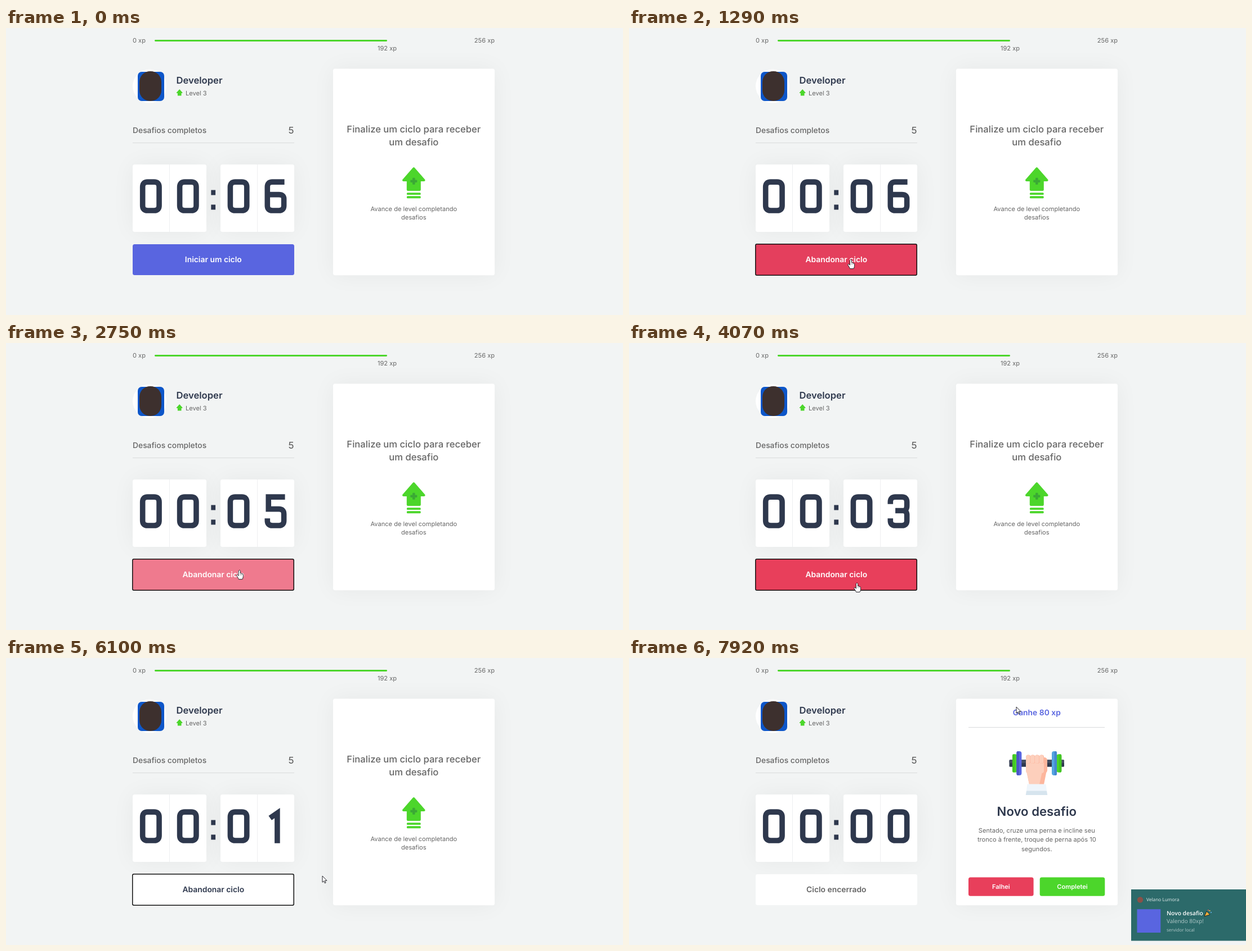
An HTML page with a canvas that plays this animation: 1096 px wide and 511 px high, repeating every 7990 ms.

```html
<!DOCTYPE html>
<html lang="pt-BR">
<head>
<meta charset="utf-8">
<title>Ciclo de desafios</title>
<style>
html, body { margin: 0; width: 100%; height: 100%; overflow: hidden; background: #f2f4f4; }
canvas { display: block; }
</style>
</head>
<body>
<canvas id="stage" width="1096" height="511"></canvas>
<script>
const ctx = document.getElementById('stage').getContext('2d');
const LOOP = 7990, FOCUS = 1060, CLICK = 1130, FINISH = 7110, NOTIFY = 7440;
const INK = '#2e384d', GRAY = '#666666', LINE = '#d9dadc', GREEN = '#4cd62b';
const BLUE = [89, 101, 224], DARK_BLUE = [73, 83, 184], RED = [232, 63, 91], WHITE = [255, 255, 255];
const SMALL = 11.09, MEDIUM = 13.86, LARGE = 16.63;
const LEFT = 225, WIDE = 287, MID = LEFT + 143.3, PANEL = 581, PANEL_MID = 724.3;

const rgb = c => `rgb(${c.map(Math.round)})`;
const mix = (a, b, p) => a.map((v, i) => v + (b[i] - v) * p);
const easeOut = (t, start, end, power = 2) =>
  1 - (1 - Math.max(0, Math.min(1, (t - start) / (end - start)))) ** power;

// pointer glides: start, end, goal x, goal y, upward bow
const ENTRY = [1008, 496];
const GLIDES = [
  [70, 910, 394, 412, 162],
  [1360, 1830, 547, 284, 0],
  [2400, 2875, 405, 427, 50],
  [4870, 5107, 561, 396, 0],
  [5340, 5440, 562, 388, 0],
  [7400, 7920, 688, 87, 0]
];

// when the cycle button heads for a new colour
const FILLS = [
  [-999, BLUE], [700, DARK_BLUE], [CLICK, RED], [1412, WHITE], [2670, RED], [4956, WHITE]
];

// moments at which the clock loses a second
const TICKS = [2140, 3060, 4070, 5150, 6100, FINISH];

// digits are stroked from shared hooks and bowls
const HOOK = 'M5 18V14Q5 5 14 5H26Q35 5 35 14';
const BOWL = 'V48Q35 57 26 57H14Q5 57 5 48';
const DIGITS = [
  'M14 5H26Q35 5 35 14' + BOWL + 'V14Q5 5 14 5Z',
  'M10 16L23 7V62',
  HOOK + 'V20Q35 25 32 29L6 52V57H39',
  HOOK + 'V21Q35 30 28 30H14M28 30Q35 30 35 38' + BOWL + 'V44',
  'M18 0L5 45H44M31 28V62',
  'M37 5H7V27H26Q35 27 35 36' + BOWL + 'V44',
  'M36 5H14Q5 5 5 14V48Q5 57 14 57H26Q35 57 35 48V36Q35 28 26 28H5'
].map(d => new Path2D(d));
const ARROW_UP = new Path2D('M0 2L18.3 23H10.5V40H-10.5V23H-18.3Z');
const POINTER = new Path2D('M0 0V11.3L2.6 9L4.3 12.9L6.1 12.1L4.4 8.3H8Z');
const HAND = new Path2D('M-1.6 1.5Q0-1.5 1.5 1.5V5.8Q3.2 5 4 6.5Q6.4 6.4 6.5 8.5V11.5' +
  'Q6.5 13.5 5 16.5H-1.5Q-2 14.5-4.6 11Q-6 8.7-4.4 8.2Q-3.2 8-1.6 10.2Z');

function box(x, y, w, h, fill, r = 0) {
  ctx.fillStyle = fill;
  ctx.beginPath();
  ctx.roundRect(x, y, w, h, r);
  ctx.fill();
}

function disc(x, y, r, fill) {
  box(x - r, y - r, 2 * r, 2 * r, fill, r);
}

// a four-sided block that narrows from one width to another
function taper(x, y, h, top, bottom, fill) {
  ctx.fillStyle = fill;
  ctx.beginPath();
  ctx.moveTo(x - top / 2, y);
  ctx.lineTo(x + top / 2, y);
  ctx.lineTo(x + bottom / 2, y + h);
  ctx.lineTo(x - bottom / 2, y + h);
  ctx.fill();
}

// y is the middle of the capitals
function text(str, x, y, size, weight = 400, color = GRAY, align = 'left', face = 'Inter') {
  ctx.font = `${weight} ${size}px ${face}, sans-serif`;
  ctx.textAlign = align;
  ctx.fillStyle = color;
  ctx.fillText(str, x, Math.floor(y + size * 0.364));
}
const center = (str, x, y, size, weight, color) => text(str, x, y, size, weight, color, 'center');
const lines = (rows, y, lead, size, weight) =>
  rows.forEach((row, i) => center(row, PANEL_MID, y + i * lead, size, weight));

function card(x, y, w, h) {
  ctx.save();
  ctx.shadowColor = 'rgba(0,0,25,.05)';
  ctx.shadowBlur = 41.6;
  box(x, y, w, h, '#fff', 3.5);
  ctx.restore();
}

function shape(path, x, y, scale, fill, stroke, width) {
  ctx.save();
  ctx.translate(x, y);
  ctx.scale(scale, scale);
  ctx.lineJoin = 'round';
  ctx.lineWidth = width;
  ctx.fillStyle = fill;
  ctx.strokeStyle = stroke;
  ctx.fill(path);
  ctx.stroke(path);
  ctx.restore();
}

function header() {
  text('0 xp', LEFT, 22.3, SMALL);
  box(264, 21, 413, 3, GREEN, 1.4);
  center('192 xp', 677, 36.2, SMALL);
  text('256 xp', 868, 22.3, SMALL, 400, GRAY, 'right');
}

function profile() {
  disc(255, 103.5, 30, '#fff');
  box(234, 78, 47, 52, '#0d56c9', 7);
  box(237, 77, 39, 53, '#3d302e', 19);
  text('Developer', 302.5, 93.7, LARGE, 600, INK);
  shape(ARROW_UP, 308.2, 109.3, 0.265, GREEN, GREEN, 4);
  text('Level 3', 319, 116.7, SMALL);
  text('Desafios completos', LEFT, 182.8, MEDIUM, 500);
  text('5', 511.5, 182.8, LARGE, 500, GRAY, 'right');
  box(LEFT, 204, WIDE, 1, LINE);
}

function digit(n, x) {
  ctx.save();
  ctx.translate(x, 269.2);
  ctx.scale(0.978, 0.978);
  ctx.strokeStyle = INK;
  ctx.lineWidth = 9.8;
  ctx.stroke(DIGITS[n]);
  ctx.restore();
}

function clock(t) {
  const seconds = 6 - TICKS.filter(k => t >= k).length;
  for (const x of [LEFT, LEFT + 156]) {
    card(x, 243, 131, 120);
    box(x + 65, 243, 1, 120, '#eeeff1');
  }
  [0, 0, 0, seconds].forEach((n, i) => digit(n, 237.8 + i * 65.9 + (i > 1 ? 23.9 : 0)));
  for (const y of [288.5, 314.5]) box(364.3, y, 7.8, 9, INK);
}

function cycleButton(t) {
  const i = FILLS.findLastIndex(f => t >= f[0]);
  const [start, fill] = FILLS[i];
  const before = i ? FILLS[i - 1][1] : fill;
  const done = t >= FINISH;
  box(LEFT, 385, WIDE, 55, rgb(mix(before, fill, easeOut(t, start, start + 200, 2.3))), 3.5);
  if (t >= FOCUS && !done) {
    ctx.strokeStyle = '#101010';
    ctx.lineWidth = 1.5;
    ctx.beginPath();
    ctx.roundRect(224.75, 384.75, 286.5, 55.5, 2.5);
    ctx.stroke();
  }
  const label = done ? 'Ciclo encerrado' : t >= CLICK ? 'Abandonar ciclo' : 'Iniciar um ciclo';
  center(label, MID, 412.8, MEDIUM, 600, done ? GRAY : fill === WHITE ? INK : '#fff');
}

function idlePanel() {
  lines(['Finalize um ciclo para receber', 'um desafio'], 180.6, 23.2, LARGE, 500);
  shape(ARROW_UP, PANEL_MID, 248, 1, GREEN, GREEN, 4);
  box(PANEL_MID - 6, 270.4, 12, 4.6, '#3ba935', 1.2);
  box(PANEL_MID - 2.3, 266.7, 4.6, 12, '#3ba935', 1.2);
  for (const y of [293.2, 299.3]) box(PANEL_MID - 12.4, y, 24.8, 3.9, GREEN, 1.5);
  lines(['Avance de level completando', 'desafios'], 322.3, 15.5, SMALL);
}

function dumbbell() {
  const skin = '#fdcfbc', shade = '#fdb69d';
  box(675.5, 181.3, 97.5, 12.4, INK, 1.5);
  box(675.5, 181.3, 97.5, 6, '#464f62', 1.5);
  const plate = (x, h, color, dark) => {
    box(x, 187.5 - h / 2, 9, h, color, 4);
    box(x + (x < PANEL_MID ? 0 : 4.5), 187.5 - h / 2, 4.5, h, dark, 2.5);
  };
  plate(681, 32.6, GREEN, '#43c525');
  plate(759.3, 32.6, GREEN, '#43c525');
  plate(688.4, 43.2, rgb(BLUE), '#4a55c6');
  plate(751, 43.2, '#55a5e0', '#4687d2');
  box(731, 177, 12, 28, shade, 5);
  taper(724, 200, 25, 36, 26, shade);
  taper(720, 200, 25, 29, 18, skin);
  box(705, 182, 32, 23, skin, 4);
  for (let i = 0; i < 4; i++) {
    box(705.2 + i * 7.9, 172.5, 8.3, 15.5, shade, 4);
    box(705.2 + i * 7.9, 172.5, 7.3, 15.3, skin, 3.6);
  }
  taper(724, 224.5, 12, 33, 36, '#eff6fc');
  taper(724, 236.5, 7.5, 36, 38.5, '#d6e4ee');
}

function challengePanel() {
  center('Ganhe 80 xp', PANEL_MID, 97.8, MEDIUM, 600, rgb(BLUE));
  box(603, 123, 242, 1, LINE);
  dumbbell();
  center('Novo desafio', PANEL_MID, 273.8, 22.18, 600, INK);
  lines(['Sentado, cruze uma perna e incline seu', 'tronco à frente, troque de perna após 10',
    'segundos.'], 307.2, 16.6, SMALL);
  [['Falhei', rgb(RED)], ['Completei', GREEN]].forEach(([label, fill], i) => {
    const x = 603 + i * 126.7;
    box(x, 390.4, 115.6, 33.4, fill, 3.5);
    center(label, x + 57.8, 407.3, SMALL, 600, '#fff');
  });
}

function toast(t) {
  const say = (str, x, y, size, color, weight = 400) =>
    text(str, x, y, size, weight, color, 'left', '"Open Sans"');
  ctx.save();
  ctx.translate(204 * (1 - easeOut(t, NOTIFY, 7880, 2.5)), 0);
  box(892, 412, 204, 91.5, '#2c6a6a');
  disc(908, 430.5, 5.2, '#8a5148');
  say('Velano Lumora', 919, 430.8, 8.3, '#e6eeee');
  box(902.5, 447.3, 41.8, 41.8, rgb(BLUE));
  say('Novo desafio', 955, 454.5, 10.3, '#fff', 600);
  say('Valendo 80xp!', 955, 468.4, 10, '#b3caca');
  say('servidor local', 955, 484.2, 8, '#b3caca');
  shape(new Path2D('M4 1L10 7L0 10Z'), 1022, 450, 1, '#f2b03c', '#1d2424', 1);
  ['#e85b5b', '#f5d04c', '#62b5ea'].forEach((c, i) => disc(1029 + i * 2.5, 449 + i * i, 1.1, c));
  ctx.restore();
}

function pointerAt(t) {
  let at = ENTRY;
  for (const [start, end, x, y, bow] of GLIDES) {
    if (t < start) break;
    const p = easeOut(t, start, end);
    at = mix(at, [x, y], p);
    at[1] -= bow * 4 * p * (1 - p);
  }
  return at;
}

function cursor(t) {
  const [x, y] = pointerAt(t);
  const over = x > LEFT && x < LEFT + WIDE && y >= 385 && y < 440;
  shape(over ? HAND : POINTER, x, y, 1, '#fff', '#1c1c22', 0.95);
  if (over) for (const dx of [1.3, 3.7]) box(x + dx, y + 6.5, 0.6, 3, '#55555c');
}

function draw(t) {
  box(0, 0, 1096, 511, '#f2f4f4');
  header();
  profile();
  clock(t);
  card(PANEL, 72.5, WIDE, 367.8);
  cycleButton(t);
  if (t < FINISH) idlePanel();
  else challengePanel();
  if (t >= NOTIFY) toast(t);
  if (t >= GLIDES[0][0]) cursor(t);
}

ctx.textRendering = 'geometricPrecision';
let begin;
function tick(now) {
  begin ??= now;
  draw((now - begin) % LOOP);
  requestAnimationFrame(tick);
}
requestAnimationFrame(tick);
</script>
</body>
</html>
```
